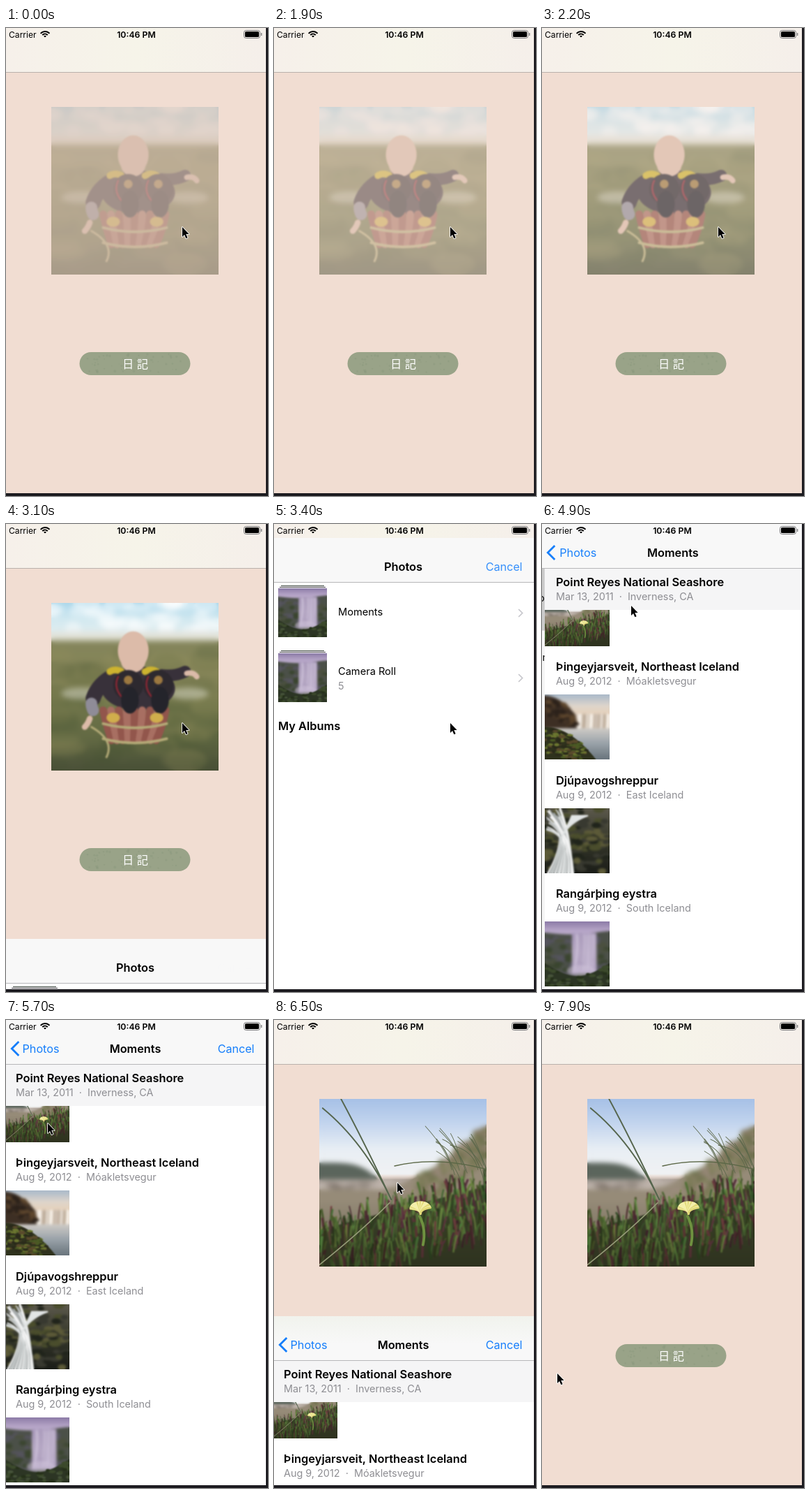
Animation, 376 px wide and 670 px high, one loop 8 s. Source, as an HTML page with a canvas:

```html
<!DOCTYPE html>
<html lang="en">
<head>
<meta charset="utf-8">
<title>Photo picker</title>
<style>
html, body { margin: 0; width: 100%; height: 100%; overflow: hidden; background: #1c1b20; }
canvas { display: block; width: 376px; height: 670px; }
</style>
</head>
<body>
<canvas id="stage"></canvas>
<script>
const LOOP = 8000, WIDTH = 373, HEIGHT = 667, BAR = 64, BLUE = '#157efb', GRAY = '#8e8e93';
const stage = document.getElementById('stage'), c = stage.getContext('2d');
const ratio = window.devicePixelRatio || 1;
stage.width = 376 * ratio;
stage.height = 670 * ratio;

let seed = 7;
const rnd = (a = 0, b = 1) => a + (b - a) * ((seed = seed * 16807 % 2147483647) / 2147483647);
const pick = list => list[Math.floor(rnd(0, list.length))];
const repeat = (n, draw) => { for (let i = 0; i < n; i++) draw(i / n); };

// ---- drawing helpers ----
function oval(g, fill, x, y, rx, ry = rx) {
  g.fillStyle = fill;
  g.beginPath();
  g.ellipse(x, y, rx, ry, 0, 0, 7);
  g.fill();
}
function curve(g, color, width, x, y, cx, cy, ex, ey) {
  g.strokeStyle = color;
  g.lineWidth = width;
  g.lineCap = 'round';
  g.beginPath();
  g.moveTo(x, y);
  g.quadraticCurveTo(cx, cy, ex, ey);
  g.stroke();
}
function fade(g, x, y, w, h, ...colors) {
  const f = g.createLinearGradient(0, y, 0, y + h);
  colors.forEach((k, i) => f.addColorStop(i / (colors.length - 1), k));
  g.fillStyle = f;
  g.fillRect(x, y, w, h);
}
// Fills everything below the line y = top(x).
function ridge(g, fill, top) {
  g.fillStyle = fill;
  g.beginPath();
  g.moveTo(0, 100);
  for (let x = 0; x <= 100; x += 2) g.lineTo(x, top(x));
  g.lineTo(100, 100);
  g.fill();
}
// Scatters spots in a band of the given depth below y = top(x).
function specks(g, n, colors, from, to, top, depth, size) {
  repeat(n, () => {
    const x = rnd(from, to);
    oval(g, pick(colors), x, top(x) + rnd(0, depth), rnd(size / 2, size), rnd(size / 4, size / 2));
  });
}
function soften(g, px) {
  g.save();
  g.setTransform(1, 0, 0, 1, 0, 0);
  g.filter = `blur(${px}px)`;
  g.drawImage(g.canvas, 0, 0);
  g.restore();
}
function box(x, y, w, h, fill) {
  c.fillStyle = fill;
  c.fillRect(x, y, w, h);
}
function pill(x, y, w, h, r) {
  c.beginPath();
  c.roundRect(x, y, w, h, r);
}
function label(s, x, y, size, color = '#000', weight = 400, align = 'left', alpha = 1) {
  c.save();
  c.globalAlpha *= alpha;
  c.font = `${weight} ${size}px Inter, "Noto Sans CJK JP", "Noto Sans CJK TC", sans-serif`;
  c.fillStyle = color;
  c.textAlign = align;
  c.fillText(s, x, y);
  c.restore();
}
function chevron(x, y, dx, color, width) {
  const dy = Math.abs(dx);
  c.strokeStyle = color;
  c.lineWidth = width;
  c.lineCap = 'butt';
  c.lineJoin = 'miter';
  c.beginPath();
  c.moveTo(x, y - dy);
  c.lineTo(x + dx, y);
  c.lineTo(x, y + dy);
  c.stroke();
}

// ---- photos, drawn once in a 100 by 100 space ----
function photo(draw) {
  const k = document.createElement('canvas');
  k.width = k.height = 480;
  const g = k.getContext('2d');
  g.scale(4.8, 4.8);
  draw(g);
  return k;
}

const tub = photo(g => {
  const cloth = '#38313a', skin = '#dcbba9', rope = '#b5ab78';
  fade(g, 0, 0, 100, 20, '#a9d6ea', '#d3e9f0', '#e3eef0');
  specks(g, 30, ['rgba(255,255,255,.4)'], 0, 100, () => 0, 17, 9);
  fade(g, 0, 17, 100, 7, '#dfe3df', '#e6e6dc', '#9a9873');
  fade(g, 0, 23, 100, 77, '#83845a', '#868558', '#70754a', '#626943', '#4a5038');
  specks(g, 60, ['rgba(160,155,100,.12)', 'rgba(60,72,45,.12)'], 0, 100, () => 25, 75, 16);
  for (const x of [18, 82]) oval(g, 'rgba(230,230,218,.45)', x, 54, 12, 3.5);
  soften(g, 8);
  oval(g, cloth, 52, 51, 22, 13);
  curve(g, cloth, 9, 38, 43, 28, 48, 25, 57);
  curve(g, cloth, 7, 66, 43, 74, 44, 80, 41);
  curve(g, '#8f8c98', 7, 24, 60, 24, 62, 25, 64);
  curve(g, skin, 3.5, 23, 69, 22, 72, 20, 74);
  curve(g, skin, 3.2, 81, 42, 85, 41, 87, 44);
  for (const side of [-1, 1]) curve(g, '#cdb32f', 4, 49 + side * 14, 41, 49 + side * 11, 39, 49 + side * 7, 41);
  oval(g, skin, 49, 28.5, 9.2, 11.5);
  oval(g, skin, 49, 34, 7.5);
  repeat(9, u => curve(g, u * 9 % 2 ? '#a86f62' : '#92564c', 4.5, 31 + u * 42, 64, 33 + u * 38, 73, 36 + u * 30, 82));
  for (const y of [74, 83]) curve(g, rope, 1.6, 31, y - 2, 50, y + 3, 69, y - 2);
  for (const x of [46, 64]) {
    oval(g, '#2d292f', x, 49, 9);
    curve(g, '#8e2633', 1, x - 6, 44, x - 9, 50, x - 4, 56);
    oval(g, '#24242b', x + 1, 58, 5.3, 8);
    oval(g, '#9c7840', x, 46, 2.6);
  }
  for (const x of [37, 63]) oval(g, '#d0ae4c', x, 68.5, 4, 3);
  curve(g, rope, 1.2, 24, 74, 38, 82, 33, 92);
  soften(g, 2);
});

const coast = photo(g => {
  const hill = x => x < 40 ? 54 : 53 - 38 * ((x - 40) / 60) ** 1.5;
  const lawn = x => 78 - x * .26;
  fade(g, 0, 0, 100, 45, '#a6c0e6', '#c3d5ee', '#e8eef4', '#f0f1f2');
  ridge(g, '#5b655c', x => 38 + 9 * (x / 34) ** 4);
  ridge(g, '#b0a59d', () => 48);
  specks(g, 70, ['rgba(100,92,84,.35)', 'rgba(205,196,188,.4)'], 0, 60, () => 50, 24, 5);
  ridge(g, '#968b78', hill);
  specks(g, 150, ['#6c6f4b', '#7d7c58', '#887c66'], 60, 100, hill, 20, 4);
  specks(g, 50, ['#858460', '#a08c82'], 45, 95, hill, 14, 3);
  soften(g, 7);
  ridge(g, '#3a4029', lawn);
  repeat(460, u => {
    const x = rnd(-2, 102), y = lawn(x) + u * 35, lean = rnd(-3, 3);
    const color = rnd() < .28 ? `hsl(${rnd(338, 358)} 30% ${rnd(18, 36)}%)` : `hsl(${rnd(75, 105)} 35% ${rnd(16, 42)}%)`;
    curve(g, color, rnd(.5, 1.6), x, y, x + lean / 3, y - 6, x + lean, y - rnd(6, 14));
  });
  fade(g, 0, 60, 100, 40, 'rgba(24,26,12,0)', 'rgba(24,26,12,.35)');
  soften(g, 2);
  repeat(16, () => {
    const x = rnd(78, 102), y = rnd(38, 50);
    curve(g, '#5c684b', .35, x, y, x - 3, y - 12, x - rnd(6, 17), y - rnd(14, 29));
  });
  for (const x of [2, 13]) curve(g, '#55654d', .8, x, (13 - x) / 2, 27, 26, 43, 60);
  curve(g, '#5b6746', .6, 45, 40, 70, 34, 100, 42);
  curve(g, '#959b78', .7, 0, 99, 25, 79, 42, 62);
  curve(g, '#6f9140', 1.6, 60, 70, 64, 78, 62, 87);
  repeat(20, u => {
    const a = Math.PI * (1 + u);
    curve(g, pick(['#f4efaa', '#e1d976']), 1.2, 60.5, 68.5, 60.5, 66, 60.5 + Math.cos(a) * 6, 65.5 + Math.sin(a) * 4);
  });
});

const cliffs = photo(g => {
  const bank = x => 50 + x * x * .008;
  fade(g, 0, 0, 100, 35, '#a9b9c9', '#ded5cb', '#e8cfb4');
  ridge(g, '#e9ded3', () => 30);
  repeat(25, u => curve(g, pick(['#faf4ec', '#cdbfb2', '#b9a894']), 2, 50 + u * 50, 31, 50 + u * 50, 40, 49 + u * 50, 52));
  const cliff = x => x < 50 ? 2 + x * x * .013 : 100;
  ridge(g, '#3d2f24', cliff);
  specks(g, 60, ['#2b211a', '#5f472d', '#4c3926'], 0, 48, cliff, 30, 6);
  fade(g, 0, 52, 100, 48, '#cfcbc6', '#98a1a8', '#69747c');
  soften(g, 9);
  ridge(g, '#2f321d', bank);
  specks(g, 140, ['#4b5a24', '#6c7730', '#2a2a1a', '#5a4a2c'], 0, 65, bank, 40, 5);
  soften(g, 4);
});

const stream = photo(g => {
  fade(g, 0, 0, 100, 100, '#5c594c', '#35372a', '#1b1d18');
  specks(g, 110, ['#4a4d2c', '#5c5a38', '#20241b', '#383930'], 0, 100, () => 0, 100, 10);
  soften(g, 6);
  repeat(40, u => curve(g, pick(['#f6f6f6', '#d5d9d9', '#a6abab']), rnd(1, 3),
    rnd(2, 25), rnd(0, 35), 40, 42, 4 + u * 42, 101));
  repeat(12, u => curve(g, '#e2e5e5', 2.5, 42 + u * 26, 12, 38, 22, 26, 45));
  soften(g, 6);
});

const falls = photo(g => {
  const shore = x => 64 + 20 * Math.sin(x * Math.PI / 100);
  fade(g, 0, 0, 100, 25, '#8b7aa6', '#b3a2c5', '#c3b4d1');
  ridge(g, '#4b5048', x => 17 + 3 * Math.sin(x / 25));
  specks(g, 110, ['#3a452f', '#4b503f', '#54535c'], 0, 100, () => 25, 60, 9);
  fade(g, 42, 18, 38, 62, '#a797bb', '#c2b4d0', '#b5a6c6');
  repeat(30, () => {
    const x = rnd(43, 79);
    curve(g, pick(['#d8cee2', '#c8bcd4', '#a596b5']), rnd(.7, 2), x, 20, x + 2, 38, x - 2, rnd(62, 79));
  });
  oval(g, 'rgba(207,195,218,.5)', 56, 76, 22, 9);
  soften(g, 9);
  ridge(g, '#2c3524', shore);
  specks(g, 80, ['#3c4a2c', '#253019', '#46533a'], 0, 100, shore, 35, 6);
  soften(g, 5);
});

const spots = Array.from({ length: 60 }, () => [rnd(112, 258), rnd(467, 493), rnd(.5, 2)]);

// ---- motion ----
// Smooth step from 0 to 1 between two times.
function ease(t, from, to) {
  const u = Math.min(1, Math.max(0, (t - from) / (to - from)));
  return u * u * (3 - 2 * u);
}
// Critically damped spring: 1 at rest, falling to 0.
function spring(ms) {
  const x = Math.max(0, ms) * .016;
  return x > 12 ? 0 : (1 + x) * Math.exp(-x);
}
// Pointer moves: start, end, then the place reached.
const MOVES = [[3650, 4050, 128, 117], [5380, 5700, 60, 148], [5850, 6100, 177, 233], [7150, 7880, 22, 506]];
const UP = 3066, PUSH = 4519, DOWN = 6366;

// ---- screens ----
function home(t) {
  box(0, 0, WIDTH, HEIGHT, '#f1ddd2');
  const bar = c.createLinearGradient(0, 0, WIDTH, 0);
  ['#f6f0ea', '#f6f4e9', '#f5efea'].forEach((k, i) => bar.addColorStop(i / 2, k));
  box(0, 0, WIDTH, BAR - 1, bar);
  box(0, BAR - 1, WIDTH, 1, '#bab1ac');
  const chosen = t > DOWN - 100;
  c.globalAlpha = chosen ? 1 : .4 + .04 * ease(t, 0, 400) + .56 * ease(t, 1750, 2850);
  c.drawImage(chosen ? coast : tub, 65, 113, 240, 240);
  c.globalAlpha = 1;
  box(65, 113, 240, 240, `rgba(140,105,80,${.16 * (1 - ease(t, 1750, 2000))})`);
  c.fillStyle = '#99a388';
  pill(105.5, 464, 159, 33, 16.5);
  c.fill();
  for (const [x, y, r] of spots) oval(c, 'rgba(125,140,112,.22)', x, y, r);
  label('日 記', 185.5, 486.5, 16.3, '#fff', 500, 'center');
}

function album(y, name, count) {
  box(10, y - 4, 62, 1, '#39433c');
  box(8, y - 2, 66, 1, '#49464d');
  c.drawImage(falls, 6, y, 70, 70);
  label(name, 92, y + (count ? 31 : 39), 14.6);
  label(count, 92, y + 52, 14.4, GRAY);
  chevron(351, y + 35.5, 5.5, '#c7c7cc', 1.7);
}
function albums(t) {
  box(-2, BAR, 375, HEIGHT - BAR, '#fff');
  if (t > PUSH - 90) box(-2, BAR, 375, 88.5, '#d2d2d2');
  album(72, 'Moments', '');
  album(165, 'Camera Roll', '5');
  label('My Albums', 6, 274.5, 16.4, '#000', 600);
}

const MOMENTS = [
  ['Point Reyes National Seashore', 'Mar 13, 2011', 'Inverness, CA', coast],
  ['Þingeyjarsveit, Northeast Iceland', 'Aug 9, 2012', 'Móakletsvegur', cliffs],
  ['Djúpavogshreppur', 'Aug 9, 2012', 'East Iceland', stream],
  ['Rangárþing eystra', 'Aug 9, 2012', 'South Iceland', falls]
];
function moments() {
  box(-2, BAR, 375, HEIGHT - BAR, '#fff');
  MOMENTS.forEach(([place, date, area, image], i) => {
    const y = 81.5 + i * 162.5, head = i ? y - 59 : BAR;
    c.drawImage(image, -2, y, 93, 93);
    if (!i) box(-2, BAR, 375, 59, '#f5f5f6');
    label(place, 14, head + 25, 16.4, '#000', 600);
    label(`${date}  ·  ${area}`, 14, head + 45, 14.4, GRAY);
  });
}

function sheet(t, top) {
  const rest = spring(t - PUSH), p = 1 - rest;
  c.save();
  c.translate(0, top);
  c.save();
  c.beginPath();
  c.rect(0, BAR, WIDTH, HEIGHT - BAR);
  c.clip();
  c.save();
  c.translate(-112 * p, 0);
  albums(t);
  c.restore();
  box(0, BAR, WIDTH, HEIGHT - BAR, `rgba(0,0,0,${.04 * p})`);
  c.translate(375 * rest, 0);
  moments();
  c.restore();

  box(0, 0, WIDTH, BAR - 1, '#f8f8f8');
  if (t > DOWN) fade(c, 0, 0, WIDTH, 40, '#f1f3ed', '#f8f8f8');
  box(0, BAR - 1, WIDTH, 1, '#b7b7b9');
  label('Photos', 185.5 - 135 * p, 47, 16.4, '#000', 600, 'center', Math.max(0, 1 - 1.5 * p));
  c.globalAlpha = p;
  chevron(18.3, 41, -10, BLUE, 2.8);
  label('Photos', 23.5 + 110 * rest, 47, 16.2, BLUE);
  label('Moments', 185.5 + 150 * rest, 47, 16.3, '#000', 600, 'center');
  c.globalAlpha = 1;
  const cancel = ease(t, 3090, 3500) - ease(t, 4500, 4700) + ease(t, 4950, 5250);
  label('Cancel', 356.5, 47, 16.1, BLUE, 400, 'right', cancel);
  c.restore();
}

function status() {
  label('Carrier', 4, 13.7, 12.1);
  label('10:46 PM', 187, 13.7, 12.3, '#000', 600, 'center');
  c.strokeStyle = '#000';
  c.lineCap = 'butt';
  c.lineWidth = 2;
  for (const r of [1.5, 5, 8.5]) {
    c.beginPath();
    c.arc(56, 13.5, r, -Math.PI * .77, -Math.PI * .23);
    c.stroke();
  }
  c.strokeStyle = '#77777a';
  c.lineWidth = 1;
  pill(341.5, 3.5, 23, 11, 3);
  c.stroke();
  c.fillStyle = '#000';
  pill(343, 5, 20, 8, 1.5);
  c.fill();
  box(366, 7, 1.3, 4, '#77777a');
}

const arrow = new Path2D('M0 0V14L3 11L5.4 16.2L7.6 15.2L5.3 10H9.6Z');
function pointer(t) {
  let x = 253, y = 285;
  for (const [from, to, nx, ny] of MOVES) {
    const u = ease(t, from, to);
    x += (nx - x) * u;
    y += (ny - y) * u;
  }
  c.save();
  c.translate(x, y);
  c.lineJoin = 'round';
  c.lineWidth = 1.7;
  c.strokeStyle = '#fff';
  c.stroke(arrow);
  c.fillStyle = '#000';
  c.fill(arrow);
  c.restore();
}

function draw(now) {
  const t = now % LOOP;
  c.setTransform(ratio, 0, 0, ratio, 0, 0);
  c.imageSmoothingQuality = 'high';
  home(t);
  const top = Math.round(HEIGHT * (spring(t - UP) + 1 - spring(t - DOWN)));
  if (top < HEIGHT) sheet(t, top);
  status();
  box(WIDTH, 0, 3, 670, '#1c1b20');
  box(0, 666, 376, 4, '#1c1b20');
  pointer(t);
  requestAnimationFrame(draw);
}
requestAnimationFrame(draw);
</script>
</body>
</html>
```
